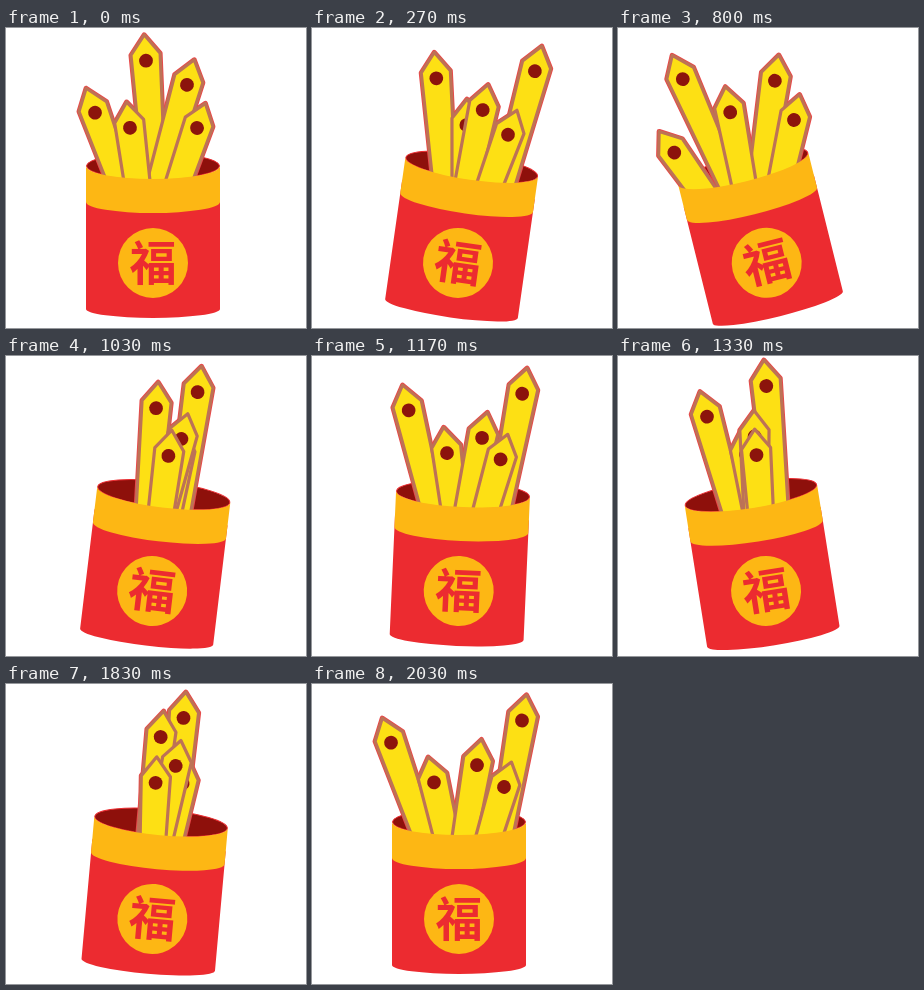
Recreate the animation shown at these times as an HTML page with a canvas. Size 300 px wide and 300 px high, loop 2560 ms.

```html
<!DOCTYPE html>
<html lang="zh">
<head>
<meta charset="utf-8">
<style>
html, body { margin: 0; width: 100%; height: 100%; overflow: hidden; background: #fff; }
canvas { display: block; width: 300px; height: 300px; }
</style>
</head>
<body>
<canvas id="stage"></canvas>
<script>
const canvas = document.getElementById('stage');
const ctx = canvas.getContext('2d');
const ratio = window.devicePixelRatio || 1;
canvas.width = canvas.height = 300 * ratio;

const LOOP = 2560, LAST = 61;
const CX = 147, CY = 235, PIVOT = 228;
const RED = '#ec2b30', GOLD = '#fdb714', DARK = '#8e100b';

// Cup angle in degrees, eased between [step, value] keys
const TILT = [[0, 0], [13, 12], [24, -14], [32, 7.7], [40, -9], [50, 9], [61, 0]];
// Swing of the sticks from left set to right set
const FIRST = 10;
const SWING = [[FIRST, 0], [24, 1], [36, 0], [49, 1], [61, 0]];

// Back to front: dot x at start, left, right; dot height; pivot
const STICKS = [
  { start: 140, left: 210, right: 110, y: 32, px: 160, py: 320 },
  { start: 181, left: 79, right: 199, y: 53, px: 135, py: 215 },
  { start: 191, left: 122, right: 208, y: 97, px: 150, py: 220 },
  { start: 89, left: 165, right: 148, y: 80, px: 140, py: 225 },
  { start: 124, left: 192, right: 84, y: 99, px: 145, py: 260 }
];

const mix = (a, b, u) => a + (b - a) * u;
const smooth = u => (1 - Math.cos(Math.PI * u)) / 2;
const linear = u => u;

function track(keys, k, ease) {
  let i = 1;
  while (i < keys.length - 1 && k > keys[i][0]) i++;
  const [k0, a] = keys[i - 1], [k1, b] = keys[i];
  return mix(a, b, ease((k - k0) / (k1 - k0)));
}

function place(s, k) {
  const x = k < FIRST
    ? mix(s.start, s.left, k / FIRST)
    : mix(s.left, s.right, track(SWING, k, linear));
  const dx = x - s.px;
  const y = s.y + 0.0018 * dx * dx;
  return { x, y, angle: Math.atan2(dx, s.py - y), len: 165 - y };
}

function stickPath(len) {
  const foot = 14.6 - len * 0.03;
  ctx.beginPath();
  ctx.moveTo(0, -26);
  ctx.lineTo(14.6, -6.5);
  ctx.lineTo(foot, len);
  ctx.lineTo(-foot, len);
  ctx.lineTo(-14.6, -6.5);
  ctx.closePath();
}

function drawStick(p, rim) {
  ctx.save();
  ctx.translate(p.x, p.y);
  ctx.rotate(p.angle);
  stickPath(p.len);
  ctx.lineJoin = 'round';
  ctx.lineWidth = rim ? 5 : 3.2;
  ctx.strokeStyle = rim ? '#e8484a' : '#bd7256';
  if (!rim) {
    ctx.fillStyle = '#fde014';
    ctx.fill();
  }
  ctx.stroke();
  if (!rim) {
    ctx.fillStyle = '#8c140c';
    ctx.beginPath();
    ctx.arc(0, 0, 6.9, 0, 7);
    ctx.fill();
  }
  ctx.restore();
}

// Front wall between two curved edges
function wall(top, topDip, bottom, bottomDip, color) {
  ctx.fillStyle = color;
  ctx.beginPath();
  ctx.ellipse(CX, top, 67, topDip, 0, Math.PI, 0, true);
  ctx.lineTo(CX + 67, bottom);
  ctx.ellipse(CX, bottom, 67, bottomDip, 0, 0, Math.PI);
  ctx.closePath();
  ctx.fill();
}

function drawCup() {
  wall(160, 10, 281, 9, RED);
  wall(138, 13, 174, 11, GOLD);
  ctx.fillStyle = GOLD;
  ctx.beginPath();
  ctx.arc(CX, CY, 35, 0, 7);
  ctx.fill();
  ctx.fillStyle = RED;
  ctx.font = 'bold 47px "Noto Sans CJK SC", "Noto Sans CJK JP", "Noto Sans CJK", sans-serif';
  ctx.textAlign = 'center';
  ctx.fillText('福', CX, 252);
}

function draw(k) {
  ctx.setTransform(ratio, 0, 0, ratio, 0, 0);
  ctx.fillStyle = '#fff';
  ctx.fillRect(0, 0, 300, 300);
  ctx.translate(CX, PIVOT);
  ctx.rotate(track(TILT, k, smooth) * Math.PI / 180);
  ctx.translate(-CX, -PIVOT);

  ctx.fillStyle = DARK;
  ctx.beginPath();
  ctx.ellipse(CX, 138, 66.5, 13, 0, 0, 7);
  ctx.fill();
  ctx.strokeStyle = RED;
  ctx.lineWidth = 1;
  ctx.stroke();

  const poses = STICKS.map(s => place(s, k));
  poses.forEach(p => drawStick(p, true));
  poses.forEach(p => drawStick(p, false));
  drawCup();
}

// 30 steps a second on a 10 ms clock, then a rest
function stepAt(ms) {
  const t = Math.floor((ms % LOOP) / 10) * 10;
  return Math.min(LAST, Math.floor((t + 4) * 0.03));
}

const begin = performance.now();
function tick() {
  draw(stepAt(performance.now() - begin));
  requestAnimationFrame(tick);
}
tick();
</script>
</body>
</html>
```
